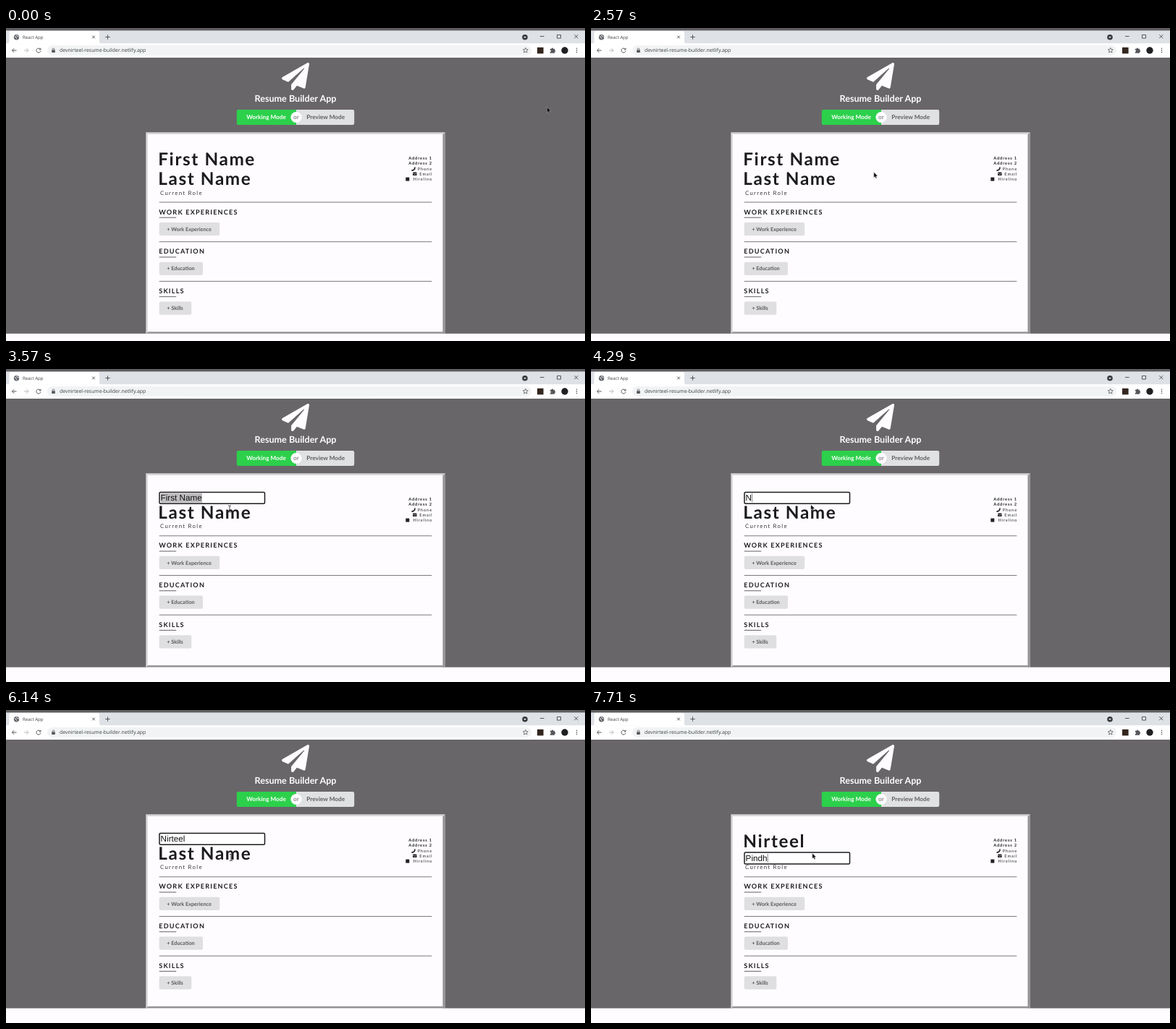
An HTML page for the animation above (8 s loop, 800 px wide and 433 px high).

```html
<!DOCTYPE html>
<html lang="en">
<head>
<meta charset="utf-8">
<title>Resume Builder App</title>
<style>
  html, body { margin: 0; width: 100%; height: 100%; overflow: hidden; background: #fefcff; }
  svg { display: block; width: 100vw; height: 100vh; }
  text { font-family: Lato, sans-serif; text-rendering: geometricPrecision; white-space: pre; }
  .ui { font-family: "Open Sans", sans-serif; fill: #3c4043; }
  .name { font-size: 24.3px; font-weight: 700; letter-spacing: 1.6px; fill: #1c1b1d; }
  .role { font-size: 7.8px; letter-spacing: 1.3px; fill: #38373a; }
  .contact { font-size: 5.7px; letter-spacing: .85px; fill: #222124; text-anchor: end; }
  .head { font-size: 9.1px; font-weight: 700; letter-spacing: 1.2px; fill: #1c1b1d; }
  .btn { font-size: 7.3px; font-weight: 700; fill: #5a585b; }
  .mode { font-size: 8.2px; font-weight: 700; text-anchor: middle; }
  .field { font: 11.7px "Liberation Sans", Arial, sans-serif; fill: #111; }
  .line { fill: none; stroke: #55575b; stroke-width: 1; }
</style>
</head>
<body>
<svg viewBox="0 0 800 433" preserveAspectRatio="none">
  <rect width="800" height="433" fill="#fefcff"/>

  <!-- browser window -->
  <rect width="800" height="4" fill="#5f5d60"/>
  <rect y="3.5" width="800" height="18" fill="#dee1e6"/>
  <path d="M2 21.5q2.500-.5 2.500-3V7q0-3 3-3H126q3 0 3 3v11.500q0 2.500 2.500 3z" fill="#fff"/>
  <circle cx="14.500" cy="12.700" r="3.700" fill="#5f6368"/>
  <path d="M11.700 11.500q2 .2 2.200 1.600t1.500 2.200M14.500 9.700q-.2 1.700 1.300 1.600t1.700 1.300" fill="none" stroke="#fff" stroke-width=".9"/>
  <text class="ui" x="23" y="15" font-size="6.100">React App</text>
  <path class="line" d="M119.200 10.700l3.600 3.600m0-3.600l-3.600 3.600M137.300 12.500h6.400m-3.200-3.200v6.400"/>
  <circle cx="717" cy="12.800" r="3.800" fill="#3a3b3e"/>
  <path d="M715.200 11.900h3.600l-1.800 2.200z" fill="#fff"/>
  <path class="line" stroke-width=".8" d="M738 11.500h5.500M761.500 9.500h5v4.600h-5zM785.300 9.200l5 5m0-5l-5 5"/>
  <rect y="21.300" width="800" height="19.700" fill="#fff"/>
  <rect x="57" y="24" width="669" height="13.800" rx="6.900" fill="#f1f3f4"/>
  <path class="line" d="M14.500 31H8.500m2.700-2.800L8.400 31l2.800 2.800"/>
  <path class="line" style="stroke:#b9bbbe" d="M25 31h6m-2.700-2.800l2.800 2.800-2.800 2.800"/>
  <path class="line" d="M47.300 29.200a3 3 0 1 0 .6 2.500M48 27.700v2.200h-2.300"/>
  <rect x="63.200" y="30.200" width="4.600" height="3.800" rx=".5" fill="#55575b"/>
  <path class="line" style="stroke-width:.8" d="M64.200 30.300v-1a1.300 1.300 0 0 1 2.600 0v1"/>
  <text class="ui" x="74" y="33.400" font-size="6.900">devnirteel-resume-builder.netlify.app</text>
  <path class="line" style="stroke-width:.8" d="M717.800 27.300l1 2.300 2.500.2-1.900 1.700.6 2.500-2.200-1.300-2.200 1.300.6-2.500-1.900-1.700 2.500-.2z"/>
  <rect x="734" y="26.800" width="8.600" height="8.600" fill="#33261f"/>
  <path d="M751.800 28.800h1.900a1.200 1.200 0 0 1 2.400 0h1.900v1.800a1.200 1.200 0 0 1 0 2.400v1.800h-6.200v-1.800a1.200 1.200 0 0 0 0-2.400z" fill="#55575b"/>
  <circle cx="772" cy="31" r="4.700" fill="#1f1e20"/>
  <g fill="#55575b"><circle cx="788.500" cy="28.200" r=".8"/><circle cx="788.500" cy="30.900" r=".8"/><circle cx="788.500" cy="33.600" r=".8"/></g>

  <!-- page -->
  <rect y="41" width="800" height="382" fill="#69666a"/>
  <path transform="translate(381 48) scale(.0743)" fill="#fefcff" d="M476 3.200L12.500 270.600c-18.100 10.400-15.800 35.600 2.200 43.200L121 358.400l287.300-253.200c5.500-4.900 13.300 2.600 8.600 8.300L176 407v80.500c0 23.600 28.500 32.900 42.500 15.800L282 426l124.600 52.200c14.200 6 30.400-2.900 33-18.200l72-432C515 7.800 493.300-6.800 476 3.200z"/>
  <text x="400" y="102" font-size="12.600" font-weight="700" fill="#fefcff" text-anchor="middle">Resume Builder App</text>
  <path d="M401 113v21h-80q-2.200 0-2.200-2.200v-16.600q0-2.200 2.200-2.200z" fill="#2cd04b"/>
  <path d="M401 113v21h78q2.200 0 2.200-2.200v-16.600q0-2.200-2.200-2.200z" fill="#e0e1e2"/>
  <circle cx="401" cy="123.500" r="7.600" fill="#fefcff"/>
  <text class="mode" x="359.500" y="126.400" fill="#fff">Working Mode</text>
  <text class="mode" x="401" y="126.200" fill="#8d8b8e">or</text>
  <text class="mode" x="441.700" y="126.400" fill="#605e61">Preview Mode</text>

  <!-- resume card -->
  <rect x="193.300" y="144.300" width="413.400" height="278.700" fill="#d8d6d9"/>
  <path d="M606.700 144.300V423h-3.400V147.700z" fill="#959296"/>
  <rect x="195.800" y="147" width="407.500" height="276" fill="#fefcff"/>
  <g id="contacts"></g>
  <g id="low">
    <rect y="422.800" width="800" height="30" fill="#fefcff"/>
    <path d="M193.300 422.800l3-2.600h407l3.400 2.600z" fill="#959296"/>
    <text class="role" x="213" y="230.700">Current Role</text>
    <g id="sections"></g>
  </g>
  <text class="name" id="first" x="210.300" y="190.300"></text>
  <text class="name" id="last" x="210.300"></text>
  <g id="input">
    <rect x="212" y="170.400" width="145.500" height="15.800" rx="1.500" fill="#fff" stroke="#1b1a1c" stroke-width="1.500"/>
    <rect id="mark" x="213.800" y="171.700" height="13.200" fill="#bfbdc1"/>
    <text class="field" id="typed" x="213.600" y="182.400"></text>
    <rect id="caret" y="172.300" width=".7" height="12" fill="#555"/>
  </g>

  <path id="arrow" d="M0 0v7.400l1.700-1.500 1.200 2.600 1.300-.6-1.200-2.500 2.300-.1z" fill="#0b0b0c" stroke="#fff" stroke-width=".3"/>
  <path id="beam" d="M-2-4.500h1.500l.5.500.5-.5H2M0-4v8M-2 4.500h1.500L0 4l.5.500H2" fill="none" stroke="#2a292b" stroke-width=".9"/>
</svg>
<script>
const $ = id => document.getElementById(id);
const LOOP = 8000, TICK = 1000 / 7, SHIFT = -10.2;
const FIRST = 'Nirteel', LAST = 'Pindh';

// contact lines, right aligned
const contacts = [['Address 1', 700], ['Address 2', 700], ['Phone', 400], ['Email', 400], ['Hirelino', 400]];
$('contacts').innerHTML = contacts.map(([label, weight], i) =>
  `<text class="contact" x="589" y="${181.7 + i * 7.4}" font-weight="${weight}">${label}</text>`).join('') +
  `<path d="M560.300 196.900q3.700-.8 4.200-4.700l1.300.4q.1 4.800-5 5.500l-.8-1.300 1.600-1.100.8.900M564.900 194.900l-1-.8.600-1.900 1.300.4z" fill="#222124"/>
   <rect x="562" y="199.600" width="5.600" height="4.400" rx=".6" fill="#222124"/>
   <path d="M562 200.700l2.800 1.700 2.800-1.700" fill="none" stroke="#fefcff" stroke-width=".6"/>
   <rect x="552.300" y="206.600" width="5" height="5" fill="#222124"/>`;

// sections: title, button label, button width
const sections = [['WORK EXPERIENCES', 'Work Experience', 83.5], ['EDUCATION', 'Education', 60.3], ['SKILLS', 'Skills', 44.6]];
$('sections').innerHTML = sections.map(([title, label, w], i) => `<g transform="translate(211.700 ${241 + i * 54.7})">
  <rect y="-.5" width="376.600" height="1" fill="#7b797c"/>
  <text class="head" x="-.5" y="16.600">${title}</text>
  <rect y="20.700" width="23.500" height="1.100" fill="#727074"/>
  <rect y="28" width="${w}" height="18.300" rx="2" fill="#dfdfe2"/>
  <text class="btn" x="10.500" y="39.800">+ ${label}</text></g>`).join('');

// pointer stops: tick, x, y
const stops = [
  [0, 747.5, 109.5], [2, 580, 246], [4, 580, 246], [8, 372, 125], [12, 450, 122.5],
  [16, 425, 215], [20, 356.5, 184], [21, 355.5, 184], [22, 355.5, 184], [24, 309, 193.5],
  [40, 309, 193.5], [43, 311, 204], [56, 311, 204]
];
function pointer(k) {
  const n = Math.max(1, stops.findIndex(s => s[0] >= k));
  const [a, x, y] = stops[n - 1], [b, u, v] = stops[n];
  const p = (k - a) / (b - a), e = p * p * (3 - 2 * p);
  return [x + (u - x) * e, y + (v - y) * e];
}

const show = (id, on) => $(id).setAttribute('visibility', on ? 'visible' : 'hidden');
const move = (id, x, y) => $(id).setAttribute('transform', `translate(${x} ${y})`);
const put = (id, s) => { if ($(id).textContent !== s) $(id).textContent = s; };

// letters typed at tick k: one at the start, then one per tick after the pause
const typedAt = (word, k, start, rest) =>
  k < start ? '' : word.slice(0, 1 + Math.max(0, k - rest + 1));

function draw(t) {
  const k = Math.floor((t + 5) / TICK) % 56;
  const editFirst = k >= 25 && k < 44, editLast = k >= 44, editing = k >= 25;

  move('low', 0, editing ? SHIFT : 0);
  put('first', editLast ? FIRST : 'First Name');
  put('last', 'Last Name');
  $('last').setAttribute('y', editing ? 206.8 : 217);
  show('first', !editFirst);
  show('last', !editLast);
  show('input', editing);
  move('input', 0, editLast ? 26.7 : 0);

  const word = editLast ? typedAt(LAST, k, 49, 51) : typedAt(FIRST, k, 30, 33);
  const selected = editing && !word;
  put('typed', word || (editLast ? 'Last Name' : 'First Name'));
  const width = $('typed').getComputedTextLength();
  $('mark').setAttribute('width', width);
  $('caret').setAttribute('x', 213.9 + width);
  show('mark', selected);
  show('caret', editing && word && !(editFirst && k >= 41));

  // the pointer turns into an arrow while keys are pressed
  const keys = (k >= 30 && k < 33) || k >= 51;
  const arrow = k < 23 || keys;
  const [x, y] = pointer(k);
  move('arrow', x - (keys ? 5.2 : 0), y - (keys ? 5.8 : 0));
  move('beam', x, y);
  show('arrow', arrow);
  show('beam', !arrow);
}

const begin = performance.now();
function frame() {
  draw((performance.now() - begin) % LOOP);
  requestAnimationFrame(frame);
}
draw(0);
requestAnimationFrame(frame);
</script>
</body>
</html>
```
